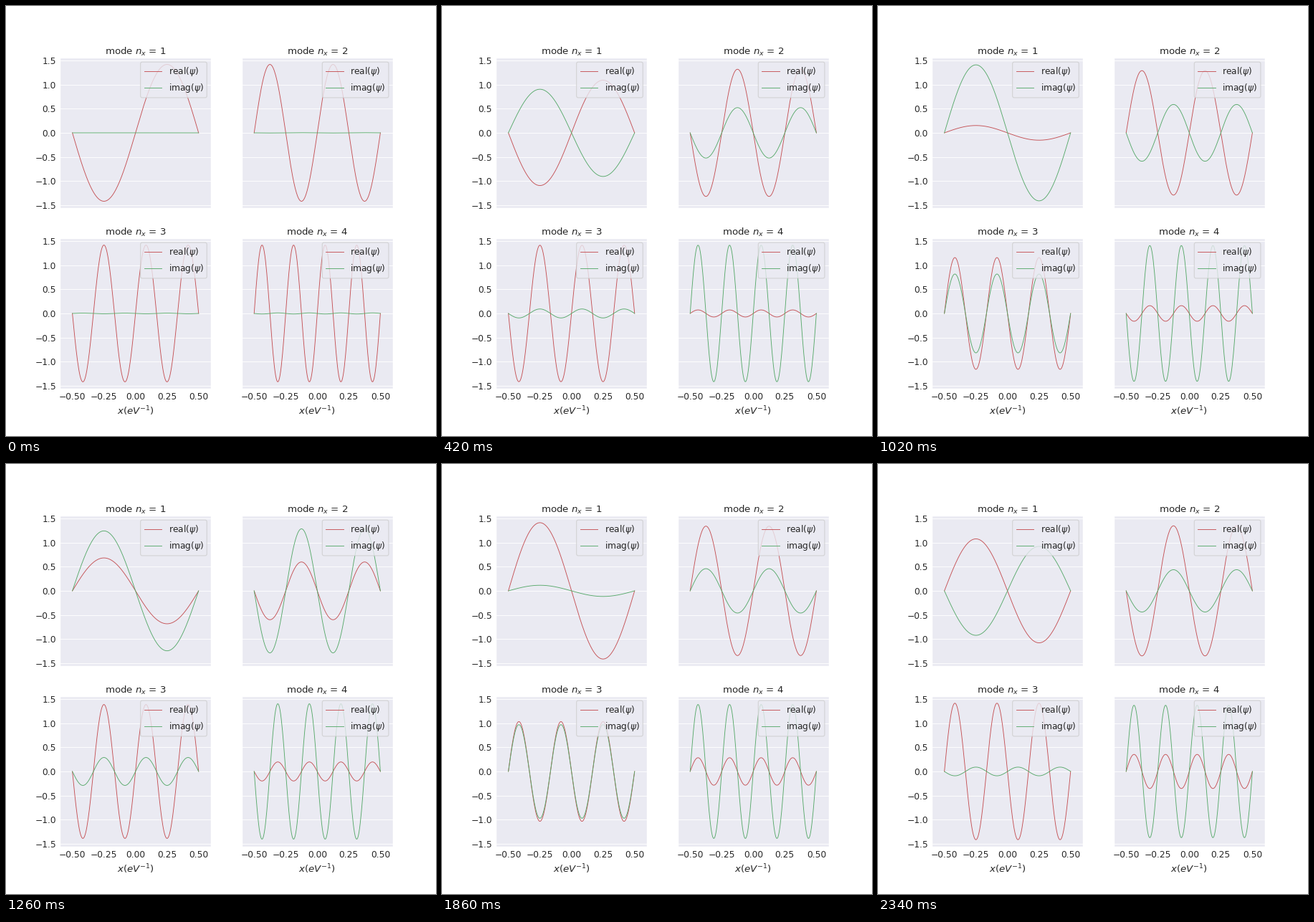
Animation of 600 by 600 pixels, one loop 2.37 s. Source, as a matplotlib script:

```python
import numpy as np
import matplotlib.pyplot as plt
from matplotlib.animation import FuncAnimation
from matplotlib.patches import FancyBboxPatch

FRAMES, INTERVAL = 79, 30
SIZE, DPI = 600, 80
RED, GREEN, PANEL, INK = "#C44E52", "#55A868", "#EAEAF2", "#262626"
LINE = 0.8

DT = 0.0025           # time advanced per frame
T0 = DT / 100         # the first picture comes just after the start
DX = 0.005            # grid spacing of the solver

plt.rcParams.update({
    "font.family": "DejaVu Sans",
    "mathtext.fontset": "dejavusans",
    "text.color": INK,
    "axes.labelcolor": INK,
    "xtick.color": INK,
    "ytick.color": INK,
})

x = np.linspace(-0.5, 0.5, 201)


def energy(n):
    """Kinetic energy of mode n on the finite difference grid."""
    k = 2 * np.pi * n
    return (1 - np.cos(k * DX)) / DX**2


def psi(n, t):
    return np.sqrt(2) * np.sin(2 * np.pi * n * x) * np.exp(-1j * energy(n) * t)


def style(ax, n):
    ax.set_facecolor(PANEL)
    ax.set_xlim(-0.6, 0.6)
    ax.set_ylim(-1.1 * np.sqrt(2), 1.1 * np.sqrt(2))
    ax.set_xticks(np.linspace(-0.5, 0.5, 5))
    ax.set_yticks(np.linspace(-1.5, 1.5, 7))
    ax.set_axisbelow(True)
    ax.grid(axis="y", color="white", lw=LINE)
    ax.tick_params(length=0, pad=4.5, labelsize=11)
    for spine in ax.spines.values():
        spine.set(color="white", linewidth=1.25)
    ax.set_title(f"mode $n_x$ = {n}", fontsize=12, pad=3)


def add_legend(ax):
    """Legend in pixels, anchored to the upper right corner of the axes."""
    box = ax.get_window_extent()
    right, top = box.x1 - 6.1, box.y1 - 6.1
    w, h = 92.6, 49.8
    left = right - w
    ax.add_patch(FancyBboxPatch(
        (left, top - h), w, h, boxstyle="round,pad=0,rounding_size=2.4",
        transform=None, fc=PANEL, ec="#CCCCCC", lw=1, alpha=0.8, zorder=5))
    rows = (("real", RED, 12.9), ("imag", GREEN, 35.9))
    for name, color, drop in rows:
        y = top - drop
        ax.add_line(plt.Line2D([left + 4.9, left + 29.3], [y, y], color=color,
                               lw=LINE, transform=None, zorder=6))
        ax.text(left + 39.1, y - 4.2, rf"{name}($\psi$)", fontsize=11,
                transform=None, va="baseline", zorder=6)


fig, axes = plt.subplots(2, 2, sharex=True, sharey=True,
                         figsize=(SIZE / DPI, SIZE / DPI), dpi=DPI,
                         facecolor="white")
curves = []
for n, ax in enumerate(axes.flat, 1):
    style(ax, n)
    real, = ax.plot(x, 0 * x, color=RED, lw=LINE)
    imag, = ax.plot(x, 0 * x, color=GREEN, lw=LINE)
    curves.append((n, real, imag))
    add_legend(ax)
for ax in axes[1]:
    ax.set_xlabel(r"$x(eV^{-1})$", fontsize=12)


def draw(frame):
    t = T0 + frame * DT
    for n, real, imag in curves:
        wave = psi(n, t)
        real.set_ydata(wave.real)
        imag.set_ydata(wave.imag)
    return [line for _, *pair in curves for line in pair]


anim = FuncAnimation(fig, draw, frames=FRAMES, init_func=lambda: draw(0),
                     interval=INTERVAL, repeat=True, repeat_delay=0)
plt.show()
```
